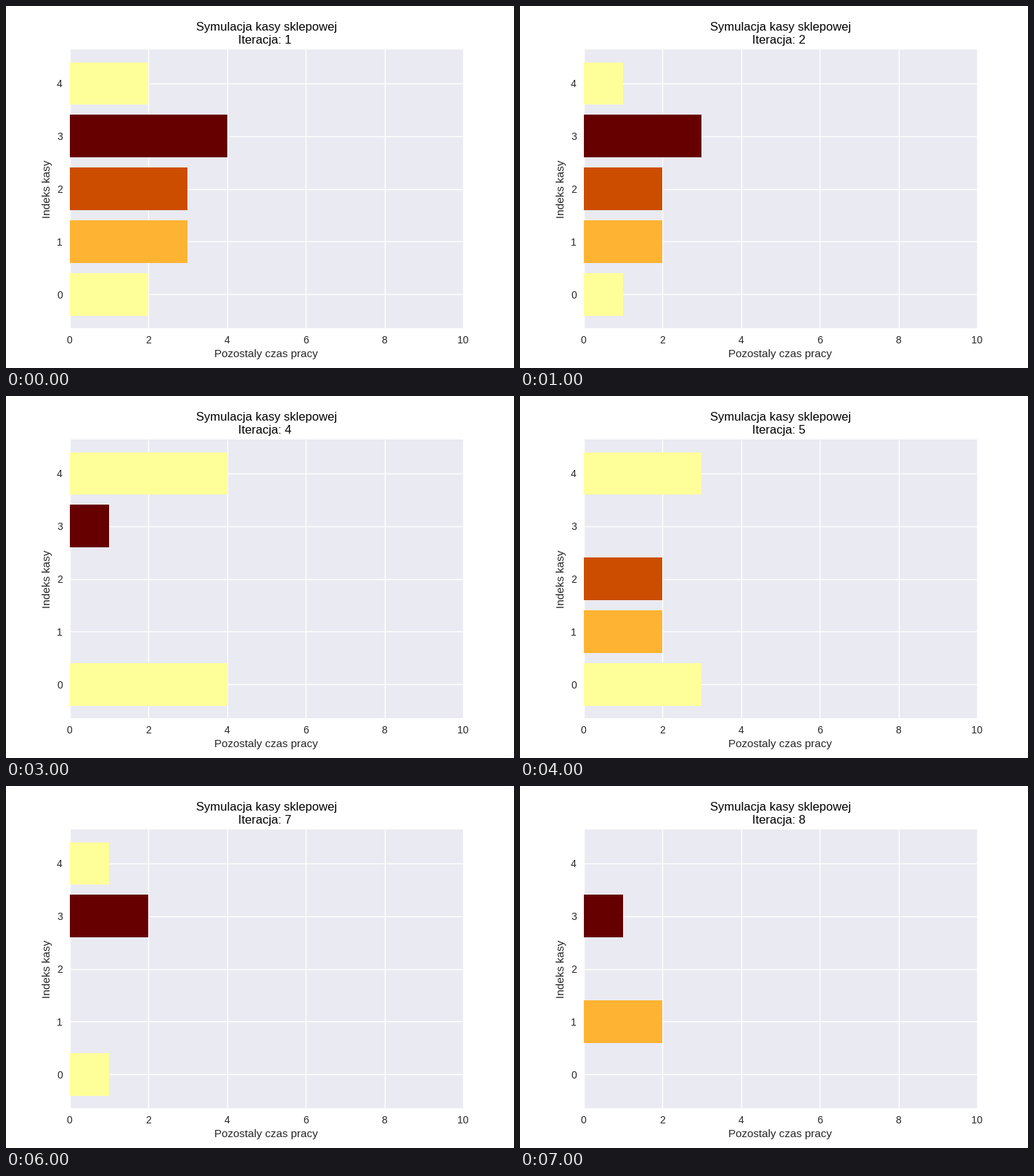
These frames come from a looping animation (700x500 px, 8 s). A matplotlib script:

```python
import matplotlib.pyplot as plt
from matplotlib.animation import FuncAnimation

TILLS = 5
ITERATIONS = 8
STEP_MS = 1000
# Service times of the customers, in order of arrival
CUSTOMERS = [2, 3, 3, 4, 2, 4, 4, 2, 2, 0, 2, 2, 0]

plt.style.use("seaborn-v0_8")
plt.rcParams["font.family"] = "Liberation Sans"


def simulate():
    """Yield the work left at every till; a free till takes the next customer."""
    queue = iter(CUSTOMERS)
    work = [0] * TILLS
    for _ in range(ITERATIONS):
        work = [left - 1 if left else next(queue, 0) for left in work]
        yield work


def till_color(till):
    """Shade from pale yellow to dark red, starting again after four tills."""
    return plt.cm.afmhot(0.8 - 0.2 * (till % 4))


history = list(simulate())

fig, ax = plt.subplots(figsize=(7, 5), dpi=100)
bars = ax.barh(range(TILLS), [0] * TILLS, height=0.8, linewidth=0,
               color=[till_color(till) for till in range(TILLS)])
ax.set_xlim(0, 10)
ax.set_ylim(-0.64, 4.64)
ax.set_yticks(range(TILLS))
ax.set_xlabel("Pozostaly czas pracy")
ax.set_ylabel("Indeks kasy")
title = ax.set_title("", color="black")


def update(frame):
    for bar, left in zip(bars, history[frame]):
        bar.set_width(left)
    title.set_text(f"Symulacja kasy sklepowej\nIteracja: {frame + 1} ")
    return [*bars, title]


anim = FuncAnimation(fig, update, frames=ITERATIONS, interval=STEP_MS,
                     repeat=True, repeat_delay=0, blit=False)
plt.show()
```
